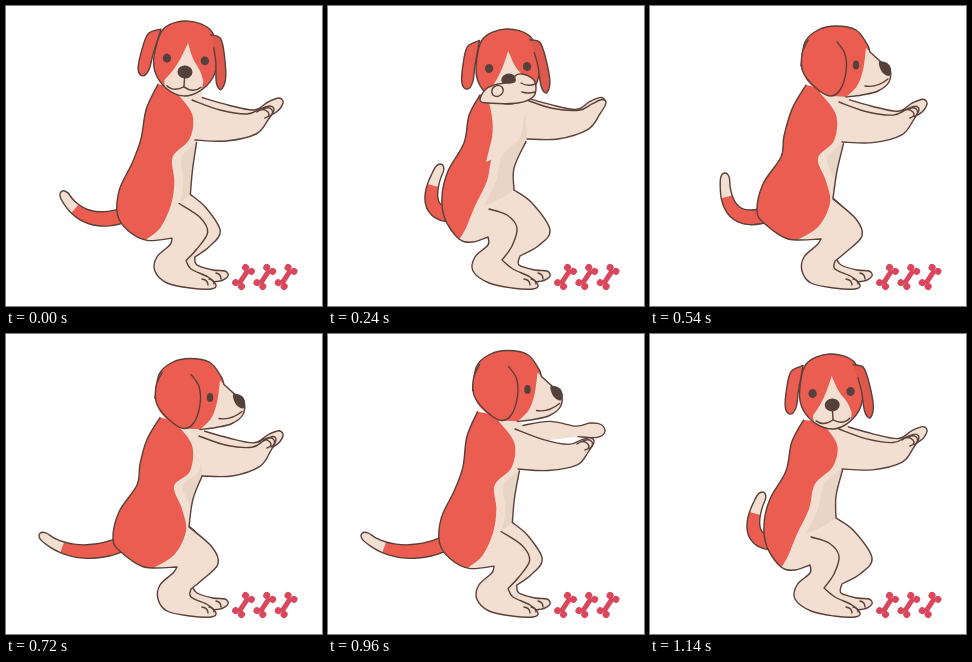
Recreate the animation shown at these times as an HTML page. Size 316 by 300 pixels, loop 1200 ms.

```html
<!DOCTYPE html>
<html lang="en">
<head>
<meta charset="utf-8">
<title>Dancing dog</title>
<style>
  html, body { margin: 0; width: 100%; height: 100%; overflow: hidden; background: #fff; }
  svg { display: block; width: 100vw; height: 100vh; }
  .line { fill: none; stroke: #5a4038; stroke-width: 1.4; stroke-linecap: round; stroke-linejoin: round; }
  .red { fill: #ea5d50; }
  .deep { fill: #df584c; }
  .skin { fill: #f2dfd1; }
  .dark { fill: #54413c; }
  .shade { fill: #e9d5c6; }
  .bone { fill: #d9475c; stroke: #d9475c; }
</style>
</head>
<body>
<svg id="stage" viewBox="0 0 316 300">
  <defs><clipPath id="trunkClip"><path id="clipShape"/></clipPath></defs>
</svg>
<script>
const LOOP = 1200, STEP = 60, WAG = 300;
const svg = document.getElementById('stage');
const parse = s => s.trim().split(/\s+/).map(p => p.split(',').map(Number));

// time, turn (0 side, 1 open), head x y, shoulder x y, paw x y, bow of the far arm
const KEYS = [
  [0, .45, 180, 52, 0, 0, 0, 0, 0],
  [240, 1, 180, 60, 10, -1, 0, -6, 0],
  [360, 0, 183, 54, -2, -3, -11, 12, -5],
  [540, 0, 184, 55, 3, 2, -2, -2, 0],
  [720, 0, 182, 59.5, 7, 8, -5, -6, 0],
  [960, .45, 177.5, 51.5, 1, 1, -3, 3, -14],
  [1140, 1, 181.5, 57, 3, 1, -2, -1, 0]
];
KEYS.push([LOOP, ...KEYS[0].slice(1)]);

// each body part: seen from the side, seen open
const BODY = {
  back: [parse('154,78 141,102 134,130 131,151 113,178 107,205 115,218 138,233 171,233'),
         parse('154,86 142,108 136,137 120,165 114,190 117,213 131,233 145,236 160,231')],
  thigh: [parse('185,255 196,246 212,230 206,213 183,193'),
          parse('174,254 184,240 189,222 179,209 161,203')],
  belly: [parse('198,88 193,112 191,137 187,165 183,192'),
          parse('198,90 196,112 190,136 186,162 186,184')],
  farKnee: [parse('183,192 197,206 208,226 197,242 186,252'),
            parse('186,184 204,197 222,224 210,240 192,250')],
  coat: [parse('170,86 186,108 184,134 168,152 176,175 180,197 168,221 145,235'),
         parse('172,88 187,110 183,132 165,150 159,175 147,200 138,222 131,234')]
};
const HEEL = parse('165,239 152,251 150,265');
const FOOT = parse('161,277 184,282 205,283 210,279 202,271 185,263');
const FAR_FOOT = parse('191,259 207,264 219,265 222,270 214,275 200,274 176,259');
const NEAR_ARM = parse('186,94 214,104 241,108 254,103 264,100 268,104 262,114 250,128 220,135 189,134');
const FAR_ARM = parse('194,91 222,99 248,104 262,96 273,92 277,97 269,107 250,114');

// tail as bezier handles from base to tip
const TAIL_OUT = parse('124,206 95,222 60,222 37,202');
const TAIL_IN = [parse('124,206 85,222 74,200 75,171'), parse('130,208 96,212 100,185 112,162')];

const mix = (a, b, f) => a + (b - a) * f;
const blend = (p, q, f) => p.map((v, i) => v.map((n, k) => mix(n, q[i][k], f)));

// smooth curve through points, without the opening move
function curve(pts) {
  let d = '';
  for (let i = 0; i < pts.length - 1; i++) {
    const a = pts[i - 1] || pts[i], b = pts[i], c = pts[i + 1], e = pts[i + 2] || c;
    const n = [b[0] + (c[0] - a[0]) / 6, b[1] + (c[1] - a[1]) / 6,
               c[0] - (e[0] - b[0]) / 6, c[1] - (e[1] - b[1]) / 6, c[0], c[1]];
    d += 'C' + n.map(v => v.toFixed(2)).join(' ');
  }
  return d;
}
const open = pts => 'M' + pts[0] + curve(pts);
const loop = pts => {
  const n = pts.length, ring = [pts[n - 1], ...pts, pts[0], pts[1]];
  return 'M' + pts[0] + 'C' + curve(ring).split('C').slice(2, n + 2).join('C') + 'Z';
};

function add(cls, d, parent = svg, tag = 'path', attrs = {}) {
  const el = document.createElementNS('http://www.w3.org/2000/svg', tag);
  if (cls) el.setAttribute('class', cls);
  if (d) el.setAttribute('d', d);
  for (const k in attrs) el.setAttribute(k, attrs[k]);
  parent.appendChild(el);
  return el;
}
const group = (attrs = {}) => add('', '', svg, 'g', attrs);
const both = (cls, d, parent) => { add(cls, d, parent); add('line', d, parent); };
const oval = (cls, cx, cy, rx, ry, parent) => add(cls, '', parent, 'ellipse', { cx, cy, rx, ry });
const set = (el, d) => el.setAttribute('d', d);
const show = (el, on) => { el.style.display = on ? '' : 'none'; };

for (let i = 0; i < 3; i++) {
  const g = group({ transform: `translate(${237.5 + i * 21.3} 271) rotate(33)` });
  add('bone', 'M0 -8V8', g).setAttribute('stroke-width', 5);
  for (const sx of [-1, 1]) for (const sy of [-1, 1]) oval('bone', sx * 3.5, sy * 9, 3, 3, g);
}

const tailSkin = add('skin'), tailRed = add('red'), tailLine = add('line');
const farLeg = add('skin'), farLegLine = add('line');
const farArm = add('skin'), farArmLine = add('line');
const trunk = add('skin');
const inside = group({ 'clip-path': 'url(#trunkClip)' });
const shade = add('shade', '', inside), coat = add('red', '', inside);
const raised = add('skin', 'M159 90Q168 118 163 136L158 156L172 150L192 128L200 92Z', inside);
const backLine = add('line'), bellyLine = add('line');
const nearArm = add('skin'), nearArmLine = add('line'), fingers = add('line');
add('line', 'M196 273q6 1 6 6M203 273q5 1 5 5M210 267q5 1 5 6');
const clipShape = document.getElementById('clipShape');

function frontHead() {
  const g = group();
  const skull = loop(parse('148,52 156,24 180,15 204,24 211,52 208,70 196,84 180,90 163,84 151,70'));
  add('red', skull, g);
  add('skin', open(parse('181,37 187,52 195,64 199,74')) + curve(parse('199,74 196,84 180,90 163,84 160,76')) +
    curve(parse('160,76 168,65 175,52 181,37')), g);
  add('line', skull, g);
  both('red', open(parse('153,25 141,30 136,44 133,66 138,73 144,66 147,50 153,25')), g);
  both('deep', open(parse('203,27 213,30 218,46 221,70 217,81 212,74 210,54 207,40')), g);
  oval('dark', 161, 53.5, 4.2, 4.5, g);
  oval('dark', 199, 53.5, 4.2, 4.5, g);
  oval('dark', 180, 66, 7.5, 6.5, g);
  add('line', 'M180 72V81M163 81Q170 87 180 81Q190 87 197 80', g);
  return g;
}

function turnedHead() {
  const g = group();
  const skull = loop(parse('152,52 159,25 182,18 206,26 214,52 210,84 200,92 182,90 165,84'));
  add('red', skull, g);
  add('skin', open(parse('189,41 196,54 204,64 212,70')) + curve(parse('212,70 210,84 200,92 182,90 172,83')) +
    curve(parse('172,83 179,71 186,56 189,41')), g);
  add('line', skull, g);
  both('red', open(parse('154,27 142,29 136,42 134,60 137,76 145,82 154,72 158,50 154,30')), g);
  both('deep', open(parse('207,25 214,31 219,46 222,66 217,77 213,66 211,48')), g);
  oval('dark', 170, 57, 4.2, 4.5, g);
  oval('dark', 206, 56, 3.5, 4.5, g);
  oval('dark', 196, 70, 7, 6.5, g);
  add('line', 'M196 76V82M174 83Q184 90 196 82Q203 88 210 82', g);
  return g;
}

function sideHead() {
  const g = group();
  const brow = parse('151,60 155,36 168,24 186,20 206,24 217,38 220,46');
  const snout = parse('220,46 231,56 240,63 239,76 228,85 212,89 196,91');
  const jaw = parse('196,91 175,88 158,76 151,60');
  add('red', open(brow) + curve(snout) + curve(jaw), g);
  add('skin', open(snout) + curve(parse('196,91 207,80 213,64 216,42')) + 'Z', g);
  add('line', open(brow) + curve(snout), g);
  add('dark', loop(parse('229,56 237,57 241,63 239,70 232,66')), g);
  add('line', 'M238 73Q227 82 215 80', g);
  both('red', open(parse('187,36 195,48 196,66 190,84 180,90 166,82 153,66 152,48 158,34')), g);
  oval('dark', 206, 59, 3.2, 4.5, g);
  return g;
}

const heads = [
  { g: frontHead(), x: 180, y: 52 },
  { g: turnedHead(), x: 183, y: 54 },
  { g: sideHead(), x: 184, y: 55 }
];
const headAt = t => t <= 300 || t >= 1140 ? 0 : t <= 420 || t >= 1080 ? 1 : 2;

const hush = group();
both('skin', loop(parse('152,94 158,83 170,78 186,76 187,70 194,68 205,73 208,82 205,91 190,97 160,97')), hush);
add('line', 'M193 77Q200 81 207 78M194 86Q200 88 207 86M165 89C161 82 169 77 174 81C178 87 170 93 165 89', hush);

function drawTail(t, turn) {
  const swing = Math.cos((t - 240) / WAG * 2 * Math.PI);
  const curl = Math.max(0, (swing + .81) / 1.81) ** 2;
  const [a, b, c, e] = blend(TAIL_OUT, blend(...TAIL_IN, turn), curl);
  const up = [], down = [], N = 8;
  for (let i = 0; i <= N; i++) {
    const u = i / N, v = 1 - u;
    const [x, y] = [0, 1].map(k => v ** 3 * a[k] + 3 * v * v * u * b[k] + 3 * v * u * u * c[k] + u ** 3 * e[k]);
    const [dx, dy] = [0, 1].map(k => v * v * (b[k] - a[k]) + 2 * v * u * (c[k] - b[k]) + u * u * (e[k] - c[k]));
    const w = mix(7.5, 4.2, u * u) / Math.hypot(dx, dy);
    up.push([x - dy * w, y + dx * w]);
    down.unshift([x + dy * w, y - dx * w]);
  }
  const reach = 4 / Math.hypot(e[0] - c[0], e[1] - c[1]);
  const tip = [0, 1].map(k => e[k] + (e[k] - c[k]) * reach);
  const whole = open([...up, tip, ...down]), cut = N - 2;
  set(tailSkin, whole);
  set(tailLine, whole);
  set(tailRed, open(up.slice(0, cut + 1)) + 'L' + down[N - cut] + curve(down.slice(N - cut)) + 'Z');
}

function drawBody(turn, hx, hy, ax, ay) {
  const part = name => blend(...BODY[name], turn);
  // the upper back follows the head
  const follow = ([x, y]) => {
    const w = Math.min(1, Math.max(0, (130 - y) / 45));
    return [x + (hx - 182) * w, y + (hy - mix(54, 57, turn)) * w];
  };
  const back = part('back').map(follow), thigh = part('thigh'), knee = part('farKnee');
  const belly = part('belly').map(([x, y], i) =>
    i === 0 ? follow([x, y]) : i < 3 ? [x + ax * .8, y + ay * .5] : [x, y]);
  const heel = HEEL.map(([x, y]) => [x + mix(2, -5, turn), y]);

  const outline = open(back) + curve([back[8], ...heel, ...FOOT, thigh[0]]) + curve(thigh);
  const rise = belly.slice().reverse();
  const whole = outline + 'L' + rise[0] + curve(rise) + 'Z';
  set(trunk, whole);
  set(clipShape, whole);
  set(backLine, outline);
  set(bellyLine, open(belly.slice(2)));

  const leg = open(knee) + curve([knee[4], ...FAR_FOOT]);
  set(farLeg, leg + 'L' + thigh[4] + 'Z');
  set(farLegLine, leg);

  const edge = part('coat').map(([x, y], i) => i < 3 ? [x, y + ay * .4] : [x, y]);
  set(coat, open(edge) + `L60 ${edge[7][1]}V50H${edge[0][0]}Z`);
  const dim = edge.slice(1, 6).map(([x, y]) => [x + 9, y]);
  set(shade, open(dim) + curve([dim[4], ...rise.slice(0, 4)]) + 'Z');
}

function drawArms(ax, ay, px, py, bow) {
  const near = NEAR_ARM.map(([x, y]) => {
    const w = Math.max(0, (x - 186) / 82) ** 2;
    return [x + ax + px * w, y + ay + py * w];
  });
  const far = FAR_ARM.map(([x, y]) => [x, y + ay * .6 + bow * Math.sin(Math.PI * (x - 194) / 83)]);
  set(farArm, open(far) + 'L204 ' + (107 + ay) + 'L190 100Z');
  set(farArmLine, open(far));
  set(nearArm, open(near) + 'Z');
  set(nearArmLine, open(near));
  const [x, y] = near[5];
  set(fingers, `M${x - 17} ${y + 2}q6 -5 11 0q3 4 -3 6m-2 -9q7 -3 9 1q2 4 -3 7`);
}

function draw(t) {
  const i = KEYS.findIndex((k, n) => t >= k[0] && t < KEYS[n + 1][0]);
  const a = KEYS[i], b = KEYS[i + 1], f = (t - a[0]) / (b[0] - a[0]);
  const [, turn, hx, hy, ax, ay, px, py, bow] = a.map((v, n) => mix(v, b[n], f));

  drawTail(t, turn);
  drawBody(turn, hx, hy, ax, ay);
  drawArms(ax, ay, px, py, bow);

  const covered = t >= 180 && t <= 300, view = headAt(t);
  show(hush, covered);
  show(raised, covered);
  show(fingers, !covered);
  hush.setAttribute('transform', `translate(${hx - 180} ${hy - 60})`);

  const tilt = view === 0 ? 10 - 13 * turn : 0;
  heads.forEach((h, n) => {
    show(h.g, n === view);
    h.g.setAttribute('transform', `translate(${hx - h.x} ${hy - h.y}) rotate(${tilt} ${h.x} ${h.y})`);
  });
}

const start = performance.now();
function tick() {
  const t = (performance.now() - start) % LOOP;
  draw(Math.floor(t / STEP) * STEP);
  requestAnimationFrame(tick);
}
draw(0);
requestAnimationFrame(tick);
</script>
</body>
</html>
```
